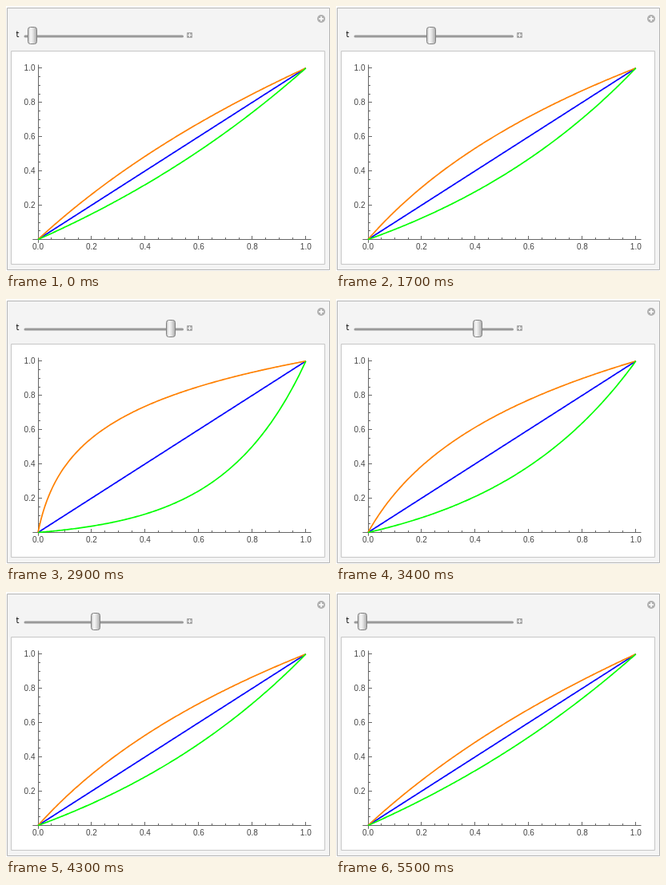
An HTML page with a canvas that plays this animation: 405 by 332 pixels, repeating every 6 s.

```html
<!DOCTYPE html>
<html lang="en">
<head>
<meta charset="utf-8">
<title>Curves with a slider</title>
<style>
  html, body { margin: 0; width: 100%; height: 100%; overflow: hidden; background: #fff; }
  canvas { display: block; }
</style>
</head>
<body>
<canvas id="stage" width="405" height="332"></canvas>
<script>
const ctx = document.getElementById('stage').getContext('2d');
const LOOP = 6000, HOLD = 500, STEP = 100, STEPS = 25;
const plot = { x: 40, y: 292.5, w: 334.8, h: 214.7 };
const px = x => plot.x + x * plot.w;
const py = y => plot.y - y * plot.h;

function box(x, y, w, h, fill, stroke, radius = 0) {
  ctx.beginPath();
  ctx.roundRect(x, y, w, h, radius);
  ctx.fillStyle = fill;
  ctx.fill();
  if (!stroke) return;
  ctx.strokeStyle = stroke;
  ctx.lineWidth = 1;
  ctx.stroke();
}

function line(x1, y1, x2, y2) {
  ctx.beginPath();
  ctx.moveTo(x1, y1);
  ctx.lineTo(x2, y2);
  ctx.stroke();
}

function plus(x, y, r, width) {
  ctx.strokeStyle = '#fff';
  ctx.lineWidth = width;
  line(x - r, y, x + r, y);
  line(x, y - r, x, y + r);
}

function panel() {
  ctx.fillStyle = '#fff';
  ctx.fillRect(0, 0, 405, 332);
  box(1.5, 2.5, 403, 328, '#f4f4f4', '#b4b4b4');
  box(6.5, 56.5, 392, 267, '#fff', '#c6c6c6');
  box(389, 11, 10, 10, '#b0b0b0', null, 5);
  plus(394, 16, 3, 1.6);
}

function slider(t) {
  ctx.fillStyle = '#000';
  ctx.font = '10px "DejaVu Sans", sans-serif';
  ctx.textAlign = 'left';
  ctx.textBaseline = 'alphabetic';
  ctx.fillText('t', 12.5, 39);
  box(22.5, 36.5, 199.5, 3, '#999', null, 1.5);
  box(226, 33, 7, 7, '#aaa', null, 1);
  plus(229.5, 36.5, 2.5, 1);

  const x = Math.round(33 + 180 * t) - 5.5;
  const shade = ctx.createLinearGradient(x, 0, x + 11, 0);
  shade.addColorStop(0, '#bdbdbd');
  shade.addColorStop(0.3, '#f8f8f8');
  shade.addColorStop(0.55, '#e4e4e4');
  shade.addColorStop(1, '#aaa');
  box(x, 26.5, 11, 21, shade, '#808080', 3);
}

function axes() {
  ctx.strokeStyle = '#666';
  ctx.lineWidth = 1;
  const left = Math.floor(plot.x) + 0.5;
  line(px(-0.02), plot.y, px(1.02), plot.y);
  line(left, py(-0.02), left, py(1.02));
  ctx.fillStyle = '#444';
  ctx.font = '10px "Liberation Sans", Arial, sans-serif';
  for (let i = 0; i <= 20; i++) {
    const v = i / 20, major = i % 4 === 0, size = major ? 4.5 : 2.5;
    const x = Math.floor(px(v)) + 0.5, y = Math.floor(py(v)) + 0.5;
    line(x, plot.y, x, plot.y - size);
    line(left, y, left + size, y);
    if (!major) continue;
    ctx.textBaseline = 'alphabetic';
    ctx.textAlign = 'center';
    ctx.fillText(v.toFixed(1), px(v), 305);
    ctx.textAlign = 'right';
    if (i) ctx.fillText(v.toFixed(1), 36.5, y + 3.5);
  }
}

function curve(f, color) {
  ctx.beginPath();
  for (let i = 0; i <= 200; i++) ctx.lineTo(px(i / 200), py(f(i / 200)));
  ctx.strokeStyle = color;
  ctx.lineWidth = 1.7;
  ctx.lineJoin = 'round';
  ctx.stroke();
}

// The slider climbs in equal steps, then returns the same way.
function valueAt(ms) {
  const n = Math.floor((ms - HOLD) / STEP);
  const up = n < STEPS ? n : 2 * STEPS - 1 - n;
  return Math.max(0, up) / STEPS;
}

function draw(now) {
  const t = valueAt(now % LOOP);
  const base = 1 + 1 / (1 - t);
  panel();
  slider(t);
  axes();
  curve(x => x, '#0000ff');
  curve(x => Math.log(1 + (base - 1) * x) / Math.log(base), '#ff8000');
  curve(x => (base ** x - 1) / (base - 1), '#00ff00');
  requestAnimationFrame(draw);
}
draw(0);
</script>
</body>
</html>
```
